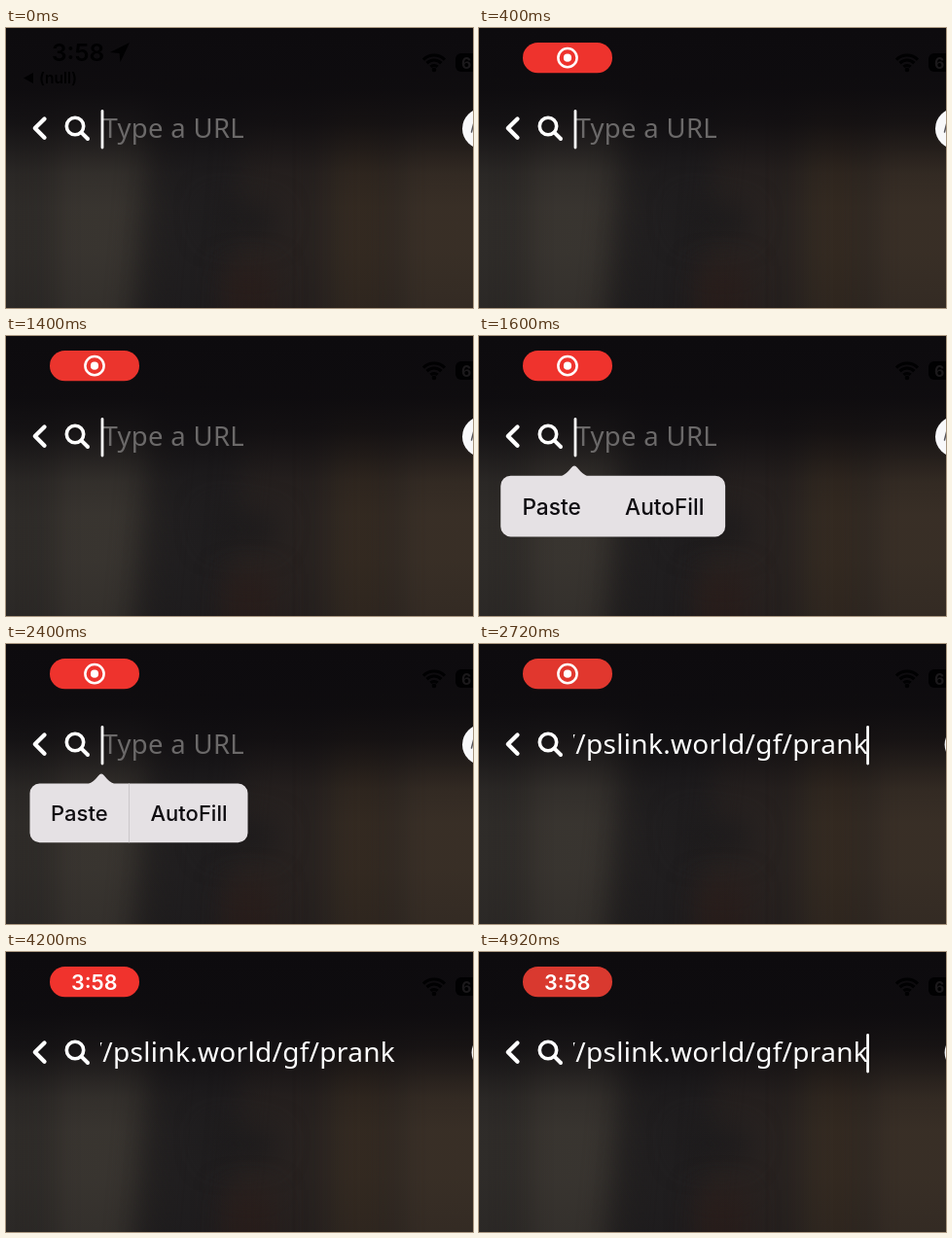
An HTML page with a canvas that plays this animation: 480x288 px, repeating every 4970 ms.

```html
<!DOCTYPE html>
<html lang="en">
<head>
<meta charset="utf-8">
<title>Paste a link</title>
<style>
  html, body { margin: 0; width: 100%; height: 100%; overflow: hidden; background: #0d0c0e; }
  canvas { display: block; width: 480px; height: 288px; }
</style>
</head>
<body>
<canvas id="stage" width="480" height="288"></canvas>
<script>
const W = 480, H = 288, LOOP = 4970;
const MENU_IN = 1400, MENU_OUT = 2440, PASTE = 2520, CLOCK = 3040;
const UI = 'Inter, "Liberation Sans", sans-serif';
const FIELD = '"Noto Sans", "Open Sans", sans-serif';
const INK = '#010102';
const ctx = document.getElementById('stage').getContext('2d');

const clamp = v => Math.max(0, Math.min(1, v));
const ramp = (t, start, length) => clamp((t - start) / length);
const mix = (a, b, k) => a + (b - a) * k;

function text(str, x, y, font, color, align = 'left') {
  ctx.font = font;
  ctx.fillStyle = color;
  ctx.textAlign = align;
  ctx.fillText(str, x, y);
}

function box(x, y, w, h, r, color) {
  ctx.fillStyle = color;
  ctx.beginPath();
  ctx.roundRect(x, y, w, h, r);
  ctx.fill();
}

function disc(x, y, r, color) {
  ctx.fillStyle = color;
  ctx.beginPath();
  ctx.arc(x, y, r, 0, Math.PI * 2);
  ctx.fill();
}

function shape(points, color, g = ctx) {
  g.fillStyle = color;
  g.beginPath();
  points.forEach(p => g.lineTo(...p));
  g.closePath();
  g.fill();
}

function line(points, width, color) {
  ctx.strokeStyle = color;
  ctx.lineWidth = width;
  ctx.beginPath();
  points.forEach(p => ctx.lineTo(...p));
  ctx.stroke();
}

function ring(x, y, r, width, color, from = 0, to = Math.PI * 2) {
  ctx.strokeStyle = color;
  ctx.lineWidth = width;
  ctx.beginPath();
  ctx.arc(x, y, r, from, to);
  ctx.stroke();
}

// Runs a drawing step with its own opacity and transform.
function layer(alpha, draw) {
  if (alpha <= 0) return;
  ctx.save();
  ctx.globalAlpha = alpha;
  draw();
  ctx.restore();
}

// Blurred backdrop, rendered once.
function makeBackdrop() {
  const c = document.createElement('canvas');
  c.width = W;
  c.height = H;
  const g = c.getContext('2d');
  g.fillStyle = '#252221';
  g.fillRect(0, 0, W, H);
  g.filter = 'blur(15px)';
  // Columns as top-left, top-right, bottom-left, bottom-right x positions.
  const columns = [
    [-60, 45, -60, 45, '#302d2a'], [45, 150, 45, 125, '#3a3631'],
    [170, 260, 145, 230, '#211f20'], [250, 325, 225, 325, '#292321'],
    [330, 400, 330, 400, '#352b22'], [400, 550, 400, 550, '#3a3027']
  ];
  for (const [a, b, d, e, color] of columns) {
    shape([[a, 60], [b, 60], [e, 350], [d, 350]], color, g);
  }
  shape([[205, 175], [280, 185], [275, 215], [210, 215]], '#1d1b1c', g);
  shape([[225, 245], [275, 245], [275, 320], [225, 320]], '#2b1f1c', g);
  g.filter = 'none';
  const shade = g.createLinearGradient(0, 0, 0, H);
  const stops = [[0, 1], [.22, .95], [.34, .78], [.43, .48], [.52, .17], [.64, .04], [.8, .04], [1, .14]];
  stops.forEach(([at, a]) => shade.addColorStop(at, `rgba(13,11,14,${a})`));
  g.fillStyle = shade;
  g.fillRect(0, 0, W, H);
  return c;
}

function drawStatus(t) {
  ctx.lineCap = 'butt';
  for (const r of [5, 10.5, 15.5]) {
    ring(440, 43.5, r, 3.1, INK, -Math.PI * .75, -Math.PI * .25);
  }
  disc(440, 43, 2.3, INK);
  box(462, 26, 30, 19, 6, INK);
  text('6', 468, 41.5, `700 16px ${UI}`, '#1b191b');

  layer(1 - ramp(t, 60, 200), () => {
    text('3:58', 47, 34, `600 24.5px ${UI}`, INK);
    shape([[127, 15], [107, 25], [116.5, 26], [117.5, 35]], INK);
    shape([[18, 51.5], [28, 46], [28, 57]], INK);
    text('(null)', 34, 57, `600 15.5px ${UI}`, INK);
  });
}

function drawPill(t) {
  const wave = (1 + Math.cos((t - 960) / 1000 * Math.PI)) / 2;
  const dim = wave ** 3;
  const color = `rgb(${mix(240, 217, dim)},${mix(51, 57, dim)},${mix(45, 47, dim)})`;
  layer(ramp(t, 60, 200), () => {
    box(45, 15, 92, 31.3, 15.6, color);
    const clock = ramp(t, CLOCK, 200);
    const alpha = ctx.globalAlpha;
    layer(alpha * (1 - clock), () => {
      ring(91, 30.7, 9.6, 2.5, '#fff');
      disc(91, 30.7, 4.1, '#fff');
    });
    layer(alpha * clock, () => text('3:58', 90.7, 38.8, `600 21.5px ${UI}`, '#fff', 'center'));
  });
}

function caretAlpha(t) {
  const start = t >= PASTE ? PASTE : t >= MENU_IN ? MENU_IN : 0;
  const p = (t - start) % 1000;
  return p < 860 ? 1 - ramp(p, 500, 110) : ramp(p, 860, 140);
}

function drawField(t) {
  const pasted = t >= PASTE;
  ctx.lineCap = ctx.lineJoin = 'round';
  line([[39.5, 93.5], [29.8, 103], [39.5, 112.7]], 4.3, '#fff');
  ring(71, 101, 8.7, 3.6, '#fff');
  line([[77.6, 107.6], [84, 114]], 4, '#fff');

  ctx.save();
  ctx.beginPath();
  ctx.rect(97, 80, 310, 50);
  ctx.clip();
  ctx.letterSpacing = '0.3px';
  if (pasted) text('https://pslink.world/gf/prank', 400, 113, `500 28px ${FIELD}`, '#fff', 'right');
  else text('Type a URL', 99.5, 113, `400 27.5px ${FIELD}`, '#6b6969');
  ctx.restore();

  layer(caretAlpha(t), () => box(pasted ? 398.2 : 97.6, 84, 2.8, 40.5, 1.4, '#fff'));

  const x = 490 + 9.6 * ramp(t, 2440, 200);
  disc(x, 103.5, 21, '#f8f8fa');
  line([[x - 9, 97], [x - 11.5, 107]], 1.5, '#55535a');
}

function drawMenu(t) {
  const u = (t - MENU_IN) / 1000;
  if (u <= 0) return;
  const scale = 1 - Math.exp(-10 * u) * Math.cos(9 * u);
  const alpha = ramp(t, MENU_IN, 120) * (1 - ramp(t, MENU_OUT, 180));
  layer(alpha, () => {
    ctx.translate(98, 133);
    ctx.scale(scale, scale);
    ctx.translate(-98, -133);
    ctx.fillStyle = '#e5e1e4';
    ctx.beginPath();
    ctx.roundRect(24.5, 143.5, 224, 60.7, 10);
    ctx.moveTo(85, 143.6);
    ctx.quadraticCurveTo(89, 143, 95, 135.5);
    ctx.quadraticCurveTo(98, 131.5, 101, 135.5);
    ctx.quadraticCurveTo(107, 143, 111, 143.6);
    ctx.closePath();
    ctx.fill();
    const font = `500 22px ${UI}`;
    text('Paste', 75.3, 182, font, '#0e0c10', 'center');
    text('AutoFill', 188, 182, font, '#0e0c10', 'center');
    ctx.globalAlpha *= ramp(t, 1900, 200);
    box(126, 143.5, 1, 60.7, 0, '#cbc7ca');
  });
}

const backdrop = makeBackdrop();

// The picture advances in alternating holds of 120 and 80 ms.
function hold(ms) {
  const start = Math.floor(ms / 200) * 200;
  return ms - start >= 120 ? start + 120 : start;
}

function render(now) {
  const t = hold(now % LOOP);
  ctx.drawImage(backdrop, 0, 0);
  drawStatus(t);
  drawPill(t);
  drawField(t);
  drawMenu(t);
  requestAnimationFrame(render);
}
requestAnimationFrame(render);
</script>
</body>
</html>
```
